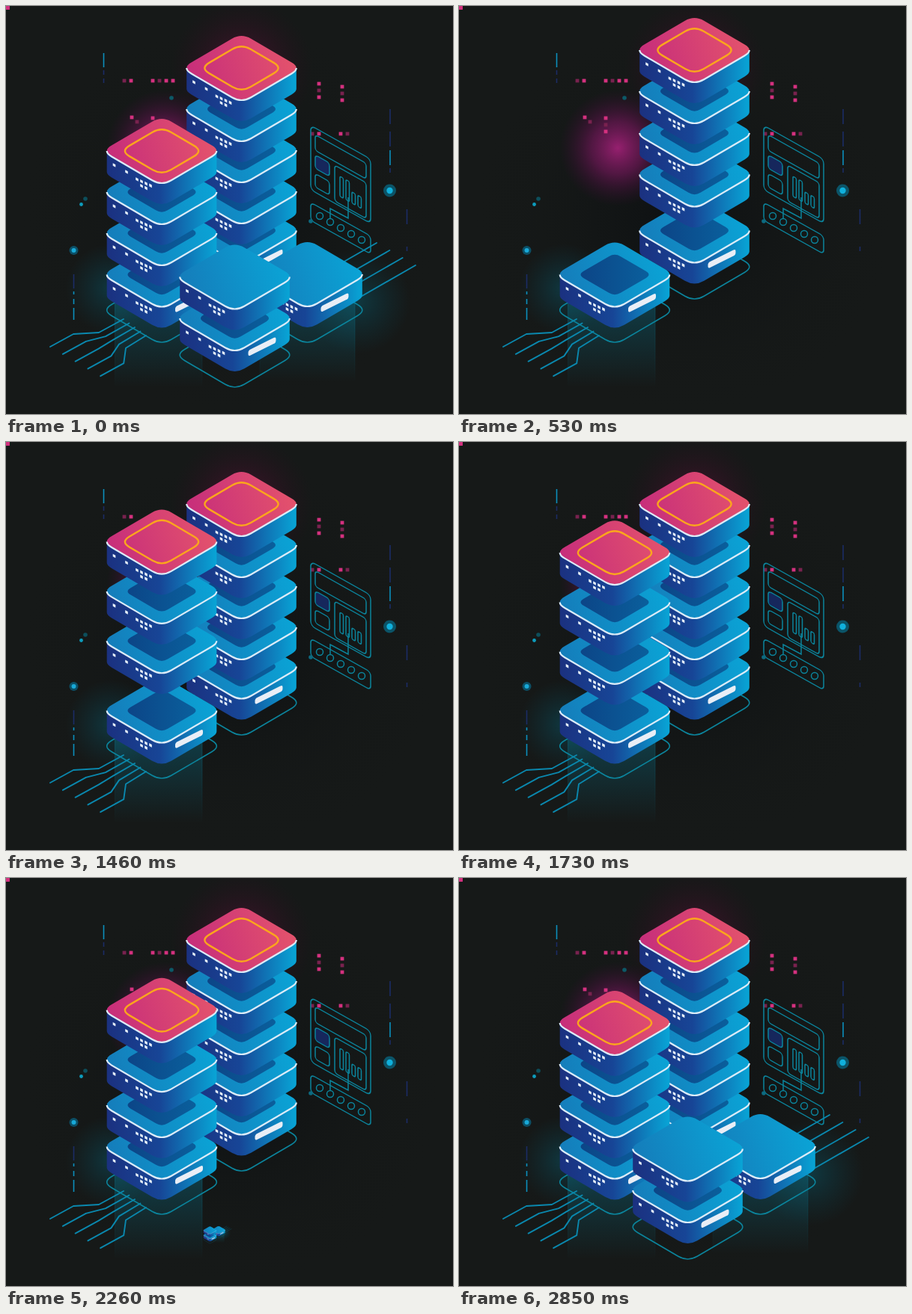
An HTML page that plays this animation: 597x546 px, repeating every 4980 ms.

```html
<!DOCTYPE html>
<html lang="en">
<head>
<meta charset="utf-8">
<title>Server towers</title>
<style>
  html, body { margin: 0; width: 100%; height: 100%; overflow: hidden; background: #161918; }
  svg { display: block; width: 100%; height: 100%; }
</style>
</head>
<body>
<svg id="stage" viewBox="0 0 597 546">
  <defs>
    <linearGradient id="side">
      <stop offset="0" stop-color="#1b3180"/><stop offset=".48" stop-color="#174596"/>
      <stop offset=".75" stop-color="#0f78b8"/><stop offset="1" stop-color="#08a5d6"/>
    </linearGradient>
    <linearGradient id="blue" x1="0" y1=".6" x2="1" y2=".4">
      <stop offset="0" stop-color="#157cba"/><stop offset="1" stop-color="#0aa4d6"/>
    </linearGradient>
    <linearGradient id="pink" x1="0" y1=".6" x2="1" y2=".4">
      <stop offset="0" stop-color="#c62d7b"/><stop offset="1" stop-color="#e4536c"/>
    </linearGradient>
    <linearGradient id="shade">
      <stop offset="0" stop-color="#0c4587"/><stop offset="1" stop-color="#0a5f9c"/>
    </linearGradient>
    <linearGradient id="beam" x1="0" y1="0" x2="0" y2="1">
      <stop offset="0" stop-color="#0b6f86" stop-opacity=".42"/><stop offset="1" stop-color="#0b6f86" stop-opacity="0"/>
    </linearGradient>
    <radialGradient id="dark"><stop offset="0" stop-color="#0d1012"/><stop offset="1" stop-color="#161918" stop-opacity="0"/></radialGradient>
    <radialGradient id="magenta"><stop offset="0" stop-color="#96206f"/><stop offset=".45" stop-color="#661751" stop-opacity=".75"/><stop offset="1" stop-color="#3a0d33" stop-opacity="0"/></radialGradient>
    <radialGradient id="maroon"><stop offset="0" stop-color="#6a1340" stop-opacity=".65"/><stop offset="1" stop-color="#30091f" stop-opacity="0"/></radialGradient>
    <radialGradient id="teal"><stop offset="0" stop-color="#0a5768" stop-opacity=".5"/><stop offset="1" stop-color="#0a4555" stop-opacity="0"/></radialGradient>
  </defs>
</svg>
<script>
const LOOP = 4980, CUT = 70;
const HALF_W = 73.3, HALF_H = 43, DEPTH = 28, STEP = 55;
const NAVY = '#1b2c66', CYAN = '#0b8fbd', WIRE = '#0b849c';
const stage = document.getElementById('stage');
const clamp = v => Math.max(0, Math.min(1, v));
const times = (n, f) => Array.from({ length: n }, (_, i) => f(i)).join('');

// Half the outline of a rounded rhombus: k = 1 front, k = -1 back
function halfEdge(k, dy = 0, w = HALF_W, h = HALF_H, round = .16) {
  const W = k * w / (1 - round / 2), H = k * h / (1 - round / 2), cx = round * W, cy = round * H;
  return `${-k * w} ${dy}Q${-k * w} ${cy / 2 + dy} ${cx - W} ${cy + dy}L${-cx} ${H - cy + dy}` +
    `Q0 ${H + dy} ${cx} ${H - cy + dy}L${W - cx} ${cy + dy}Q${k * w} ${cy / 2 + dy} ${k * w} ${dy}`;
}
const rhombus = (scale = 1, round) =>
  [1, -1].map((k, i) => 'ML'[i] + halfEdge(k, 0, HALF_W * scale, HALF_H * scale, round)).join('') + 'Z';
const path = (d, fill, stroke = 'none', w = 0) => `<path d="${d}" fill="${fill}" stroke="${stroke}" stroke-width="${w}"/>`;

const glow = (id, x, y, rx, ry = rx) => `<ellipse cx="${x}" cy="${y}" rx="${rx}" ry="${ry}" fill="url(#${id})"/>`;
const dot = (x, y, r, c) => `<circle cx="${x}" cy="${y}" r="${r}" fill="${c}"/>`;
const wire = pts => `<polyline points="${pts}" fill="none" stroke="#0a88ae" stroke-width="1.9" stroke-linejoin="round" stroke-linecap="round"/>`;
const column = (x, y1, y2, c, dashes = 'none') =>
  `<path d="M${x} ${y1}V${y2}" stroke="${c}" stroke-width="1.6" stroke-dasharray="${dashes}"/>`;
const box = (x, y, w, h, r, fill = 'none') => `<rect x="${x}" y="${y}" width="${w}" height="${h}" rx="${r}" fill="${fill}"/>`;
const at = (x, y, content) => `<g transform="translate(${x} ${y})">${content}</g>`;
const footprint = (x, y) => at(x, y, path(rhombus(), 'none', WIRE, 1.6));
const beam = (x1, x2, y, h) => box(x1, y, x2 - x1, h, 0, 'url(#beam)') +
  [x1, x2].map(x => box(x - .5, y, 1, h, 0, 'url(#beam)')).join('');

const led = (x, y) => `<path d="M${x - 1.8} ${y - 2.8}l3.6 2v3.6l-3.6-2z" fill="#e6f0fa"/>`;
const leds = [4, 2].map((n, row) => times(n, i => led(6 * (i + row) - 33, 38 + 2.8 * (i + row) + 6 * row))).join('');
const slotBar = `<g transform="matrix(1 -.5 0 1 18 43)">${box(0, 0, 37, 8, 3, '#e9eef6')}</g>`;

function slab(x, y, { kind = 'blue', shadow = false, slot = false } = {}) {
  return at(x, y,
    path(`M${-HALF_W} 0L${halfEdge(1, DEPTH)}V0Z`, 'url(#side)') + path(rhombus(), `url(#${kind})`) +
    (shadow ? path(rhombus(.62), 'url(#shade)') : '') +
    (kind === 'pink' ? path(rhombus(.67, .22), 'none', '#fba61c', 2.4) : '') +
    path('M' + halfEdge(1), 'none', '#dcecf8', 2.2) + led(-63.5, 19) + led(-47, 28) + leds + (slot ? slotBar : ''));
}

// Runs of small squares, the second of each one dimmed
const run = (x, y, n, dx, dy) => times(n, i =>
  box(x + i * dx - 2.4, y + i * dy - 2.4, 4.8, 4.8, 0, i === 1 ? '#79224f' : '#d4317f'));
const squares = () => run(167, 100, 2, -9, 0) + run(196, 100, 4, 9, 0) + run(196, 131, 1) + run(168, 149, 2, 7, 6) +
  run(196, 150, 3, 0, 9) + run(418, 104, 3, 0, 9) + run(418, 141, 1) + run(449, 108, 3, 0, 9) +
  run(418, 171, 2, -9, 0) + run(447, 171, 2, 9, 0);

function panel() {
  const bars = times(4, i => box(39 + 8 * i, i < 2 ? 46 : 58, 4.5, i < 2 ? 27 : 15, 2));
  const knobs = times(5, i => `<circle cx="${419 + 14 * i}" cy="${281 + 8 * i}" r="4.5"/>`);
  return `<g fill="none" stroke="${WIRE}" stroke-width="1.5"><g transform="matrix(1 .56 0 1 407 160)">` +
    box(0, 0, 80, 86, 6) + box(6, 9, 68, 21, 4) + box(6, 36, 19, 18, 4, '#16275c') + box(6, 61, 19, 18, 4) +
    box(32, 35, 42, 48, 4) + bars + box(0, 103, 80, 24, 5) + `</g>${knobs}` +
    `<path d="M457 256V284L433 271V285"/></g>` + dot(407, 288, 2.8, '#0c6a80');
}

function backdrop() {
  return box(0, 0, 597, 546, 0, '#161918') + glow('dark', 300, 285, 285, 265) +
    glow('magenta', 212, 190, 78) + glow('maroon', 315, 85, 95) + glow('teal', 140, 378, 60) +
    column(130.5, 63, 82, CYAN) + column(130.5, 86, 103, NAVY, '6 5') +
    column(90.5, 359, 378, NAVY) + column(90.5, 382, 420, CYAN, '4 6 7 5 16') +
    column(513, 138, 188, NAVY, '20 10') + column(513, 193, 213, CYAN) + column(513, 217, 223, NAVY) +
    column(535.5, 272, 328, NAVY, '20 30') + squares() + panel() +
    dot(90.5, 327, 6, '#0c4f66') + dot(90.5, 327, 3, '#18a9d8') + dot(100.5, 265.5, 2.4, '#0d9dbd') +
    dot(106, 258, 2.8, '#0c4f5c') + dot(221, 123, 2.8, '#0c5a68') +
    dot(512.5, 247, 8.5, '#0b5468') + dot(512.5, 247, 4.2, '#10b0dc');
}

const leftCables = () => times(5, i => {
  const x = 59 + 16.8 * i, y = 456 + 9.8 * i;
  return wire(`${x},${y} ${x + 31},${y - 17} ${124 + 9 * i},${437 + 5.2 * i} ${157 + 7.5 * i},${419 + 5.5 * i}`);
});
const rightCables = () => times(4, i => {
  const x = 495 + 17.3 * i, y = 317 + 10 * i;
  return wire(`${x},${y} ${x - 80},${y + 46}`);
});

const frontGroup = () => '<g id="front">' + glow('teal', 470, 395, 70) + beam(339, 466, 395, 108) + rightCables() +
  footprint(402.5, 407) + slab(402.5, 359, { slot: true }) + footprint(305.5, 467) +
  slab(305.5, 418, { shadow: true, slot: true }) + slab(305.5, 362.5) + '</g>';

// Slabs show up one by one (start, gap), then sink by drop px, landing from first to first + span
const right = { x: 314.5, y: 248, n: 4, start: 190, gap: 90, drop: 24, fall: 500, first: 1000, span: 300, power: 3 };
const left = { x: 208, y: 304, n: 3, start: 1130, gap: 110, drop: 66, fall: 1222, first: 2160, span: 420, power: 1 };
const floating = ({ x, y, n }) => times(n, i =>
  `<g class="float">${slab(x, y - STEP * i, i === n - 1 ? { kind: 'pink' } : { shadow: true })}</g>`);

stage.insertAdjacentHTML('beforeend', backdrop() +
  footprint(314.5, 349) + slab(314.5, 300.5, { shadow: true, slot: true }) + floating(right) +
  beam(145.5, 262, 398, 112) + footprint(208, 407) + leftCables() +
  slab(208, 359.5, { shadow: true, slot: true }) + floating(left) + frontGroup());

const floats = [...stage.querySelectorAll('.float')];
const front = document.getElementById('front');

function poseTower(tower, nodes, t) {
  const { n, start, gap, drop, fall, first, span, power } = tower;
  nodes.forEach((node, i) => {
    const land = first + span * (i / (n - 1)) ** power;
    const settled = t < CUT;
    node.setAttribute('opacity', settled ? 1 : clamp((t - start - gap * i) / 60));
    node.setAttribute('transform', `translate(0 ${settled ? 0 : -drop * clamp((land - t) / fall)})`);
  });
}

function render(t) {
  poseTower(right, floats.slice(0, right.n), t);
  poseTower(left, floats.slice(right.n), t);
  const s = t < CUT ? 1 : clamp((t - 2190) / 600);
  front.setAttribute('visibility', s > 0 ? 'visible' : 'hidden');
  front.setAttribute('transform', `translate(268 486) scale(${s}) translate(-268 -486)`);
}

const start = performance.now();
function tick() {
  render((performance.now() - start) % LOOP);
  requestAnimationFrame(tick);
}
render(0);
requestAnimationFrame(tick);
</script>
</body>
</html>
```
